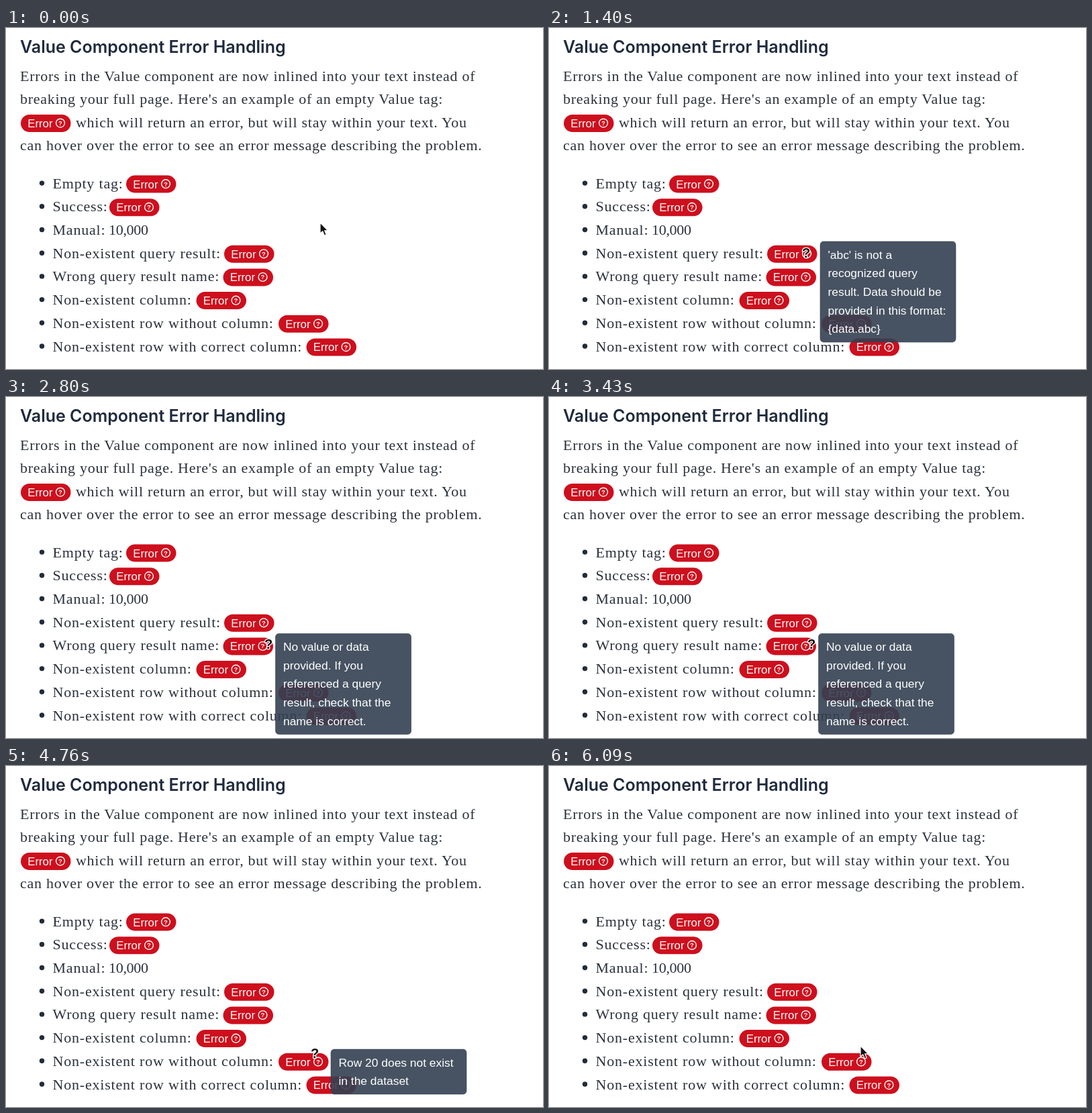
An HTML page for the animation above (6.16 s loop, 800x508 px).

```html
<!DOCTYPE html>
<html lang="en">
<head>
<meta charset="utf-8">
<title>Value Component Error Handling</title>
<style>
  html, body { margin: 0; width: 100%; height: 100%; overflow: hidden; background: #fff; }
  svg { display: block; width: 800px; height: 508px; }
  text { white-space: pre; }
  .title { font: 600 25px Inter, sans-serif; fill: #1f2a3d; }
  .body { font: 22px "Liberation Serif", serif; letter-spacing: .8px; fill: #2a313b; }
  .lead { letter-spacing: .73px; }
  .digits { letter-spacing: -.3px; }
  .ui { font: 17.4px "Liberation Sans", sans-serif; fill: #fff; }
  .badge { font-size: 16.8px; }
  .mark { font: bold 9.5px "Liberation Sans", sans-serif; fill: #fff; text-anchor: middle; }
  .help { font: bold 20px "Liberation Sans", sans-serif; text-anchor: middle;
          fill: #111; stroke: #fff; stroke-width: 2.6px; stroke-linejoin: round; paint-order: stroke; }
</style>
</head>
<body>
<svg id="stage" viewBox="0 0 800 508"></svg>
<script>
const LOOP = 6160, STEP = 70;

const label = (x, y, s, cls) => `<text x="${x}" y="${y}" class="${cls}">${s}</text>`;

const pill = (x, cy) => `<g transform="translate(${x} ${cy})">
  <rect y="-13" width="74.5" height="26" rx="13" fill="#ce0f1d"/>
  ${label(10.2, 5.9, "Error", "ui badge")}
  <circle cx="59" cy="-.4" r="6.4" fill="none" stroke="#fff" stroke-width="1.4"/>
  ${label(59, 3, "?", "mark")}</g>`;

const paragraph = [
  [21, 79, "Errors in the Value component are now inlined into your text instead of"],
  [21, 113, "breaking your full page. Here's an example of an empty Value tag:"],
  [104, 148, "which will return an error, but will stay within your text. You"],
  [21, 182, "can hover over the error to see an error message describing the problem."]
];

// Item text and the left edge of its error pill
const items = [
  ["Empty tag:", 179], ["Success:", 154], ["Manual:"],
  ["Non-existent query result:", 325], ["Wrong query result name:", 323.5],
  ["Non-existent column:", 283.5], ["Non-existent row without column:", 406],
  ["Non-existent row with correct column:", 447.5]
];

// Hover periods: start, end, box position, message
const tips = [
  [980, 1960, 404, 318, ["'abc' is not a", "recognized query", "result. Data should be",
    "provided in this format:", "{data.abc}"]],
  [2590, 3850, 401.5, 352.5, ["No value or data", "provided. If you", "referenced a query",
    "result, check that the", "name is correct."]],
  [4410, 5740, 484, 422, ["Row 20 does not exist", "in the dataset"]]
];

// Pointer stops: time, x, y
const path = [
  [0, 468, 290], [490, 468, 290], [1120, 383, 335], [1750, 383, 335],
  [2240, 436, 364], [2700, 391, 368], [3690, 391, 368], [3920, 412, 383],
  [4480, 460, 428], [5600, 460, 428], [5900, 464, 417], [LOOP, 464, 417]
];

const tip = ([, , x, y, lines]) => `<g transform="translate(${x} ${y})" visibility="hidden">
  <rect width="202" height="${lines.length * 27.7 + 11.5}" rx="5"
    fill="#344152" fill-opacity=".9" stroke="#344152" stroke-opacity=".6"/>
  ${lines.map((s, i) => label(11.5, 25.5 + i * 27.7, s, "ui")).join("")}</g>`;

const item = ([s, x], i) => {
  const y = 238.6 + i * 34.7;
  return `<circle cx="53.5" cy="${y - 7.5}" r="3.7" fill="#222c3a"/>` + label(69.5, y, s, "body") +
    (x ? pill(x, y - 6) : label(153, y, "10,000", "body digits"));
};

const stage = document.getElementById("stage");
stage.innerHTML = label(21, 37, "Value Component Error Handling", "title") +
  paragraph.map(p => label(...p, "body lead")).join("") + pill(22, 142) +
  items.map(item).join("") +
  `<g id="tips">${tips.map(tip).join("")}</g>
  <g id="pointer">
    <path id="arrow" d="M0 0V16.2L3.7 12.8 6.4 19 9.2 17.8 6.6 11.8H11.6Z"
      fill="#111" stroke="#fff" stroke-width="1.2" stroke-linejoin="round"/>
    ${label(0, 7, "?", "help")}
  </g>`;

const boxes = [...document.getElementById("tips").children];
const pointer = document.getElementById("pointer");
const arrow = document.getElementById("arrow");
const help = arrow.nextElementSibling;
const show = (el, on) => el.setAttribute("visibility", on ? "visible" : "hidden");

function pointerAt(t) {
  const i = path.findIndex(p => p[0] > t);
  const [t0, x0, y0] = path[i - 1], [t1, x1, y1] = path[i];
  const u = (t - t0) / (t1 - t0), k = u * u * (3 - 2 * u);
  return [x0 + (x1 - x0) * k, y0 + (y1 - y0) * k];
}

function draw(now) {
  const t = Math.floor(now % LOOP / STEP) * STEP;
  let hovering = false;
  tips.forEach(([start, end], i) => {
    const on = t >= start && t < end;
    show(boxes[i], on);
    hovering = hovering || on;
  });
  show(arrow, !hovering);
  show(help, hovering);
  pointer.setAttribute("transform", `translate(${pointerAt(t)})`);
  requestAnimationFrame(draw);
}
draw(0);
</script>
</body>
</html>
```
